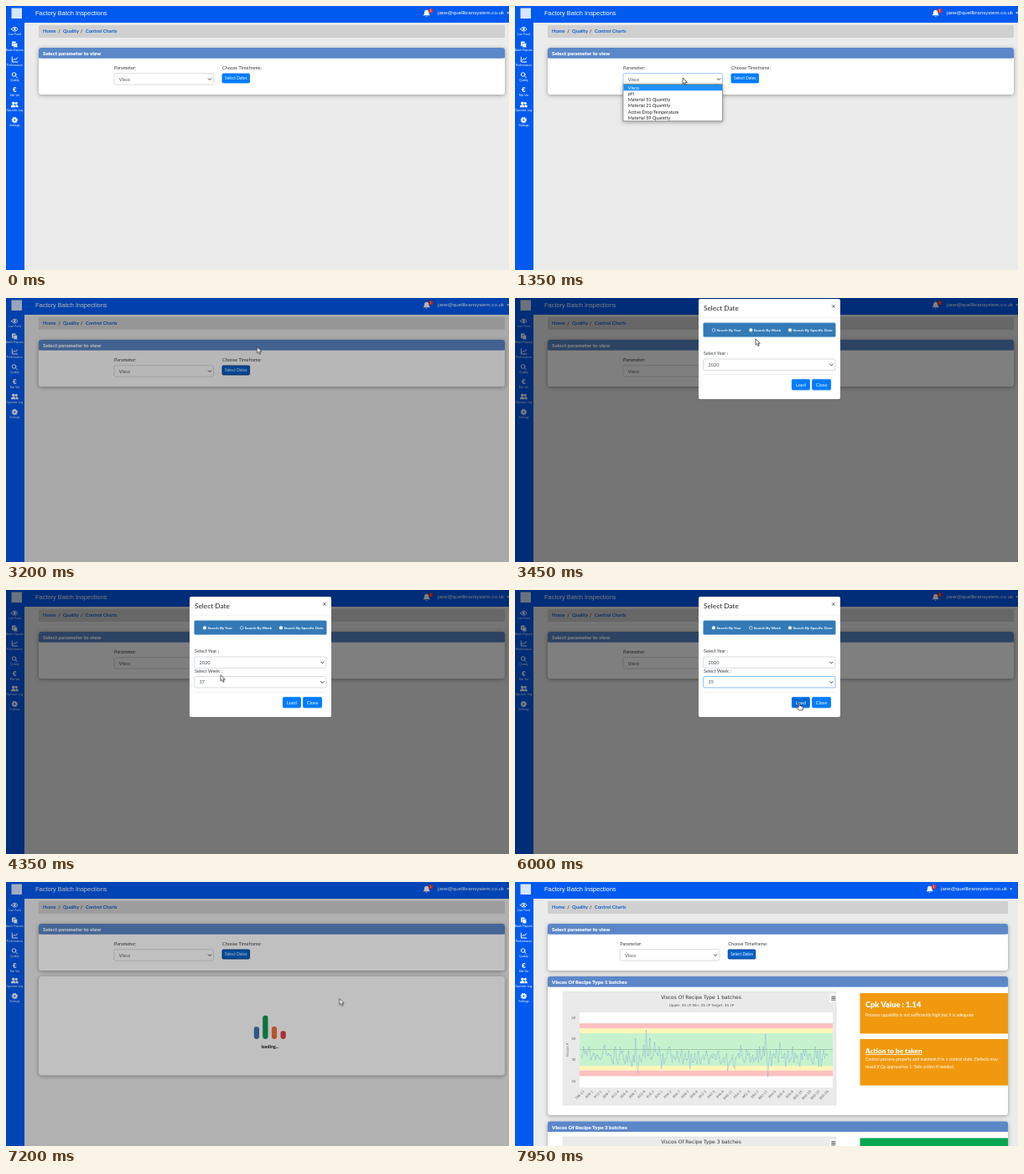
These frames come from a looping animation (600x316 px, 8000 ms). An HTML page:

```html
<!DOCTYPE html>
<html lang="en">
<head>
<meta charset="utf-8">
<title>Control charts</title>
<style>
  html, body { margin: 0; width: 100%; height: 100%; overflow: hidden; background: #ebebeb; }
  svg { display: block; width: 100vw; height: 100vh; font-family: Lato, sans-serif; }
  text { white-space: pre; }
  .arial { font-family: "Liberation Sans", Arial, sans-serif; }
  .chart { font-family: "DejaVu Sans", sans-serif; }
  .bold { font-weight: 700; }
  .heavy { font-weight: 900; }
  .mid { text-anchor: middle; }
  .end { text-anchor: end; }
  .shadow { filter: drop-shadow(0 1.5px 2.5px rgba(0, 0, 0, .35)); }
  .line { fill: none; stroke: #fff; stroke-width: 1; stroke-linecap: round; stroke-linejoin: round; }
</style>
</head>
<body>
<svg id="stage" viewBox="0 0 600 316" preserveAspectRatio="none"></svg>
<script>
const LOOP = 8000;
const BLUE = '#005af0', BUTTON = '#007bff', INK = '#3a3f44';
const RESULTS_AT = 7400;
const stage = document.getElementById('stage');
const $ = id => document.getElementById(id);

// Drawing helpers; text is placed by the middle of its capitals.
const rect = (x, y, w, h, fill, extra = '') =>
  `<rect x="${x}" y="${y}" width="${w}" height="${h}" fill="${fill}" ${extra}/>`;
const text = (x, y, str, size, fill = INK, cls = '', extra = '') =>
  `<text x="${x}" y="${y + size * .36}" font-size="${size}" fill="${fill}" class="${cls}" ${extra}>${str}</text>`;
const circle = (x, y, r, extra) => `<circle cx="${x}" cy="${y}" r="${r}" ${extra}/>`;
const group = (id, body) => `<g id="${id}">${body}</g>`;
const path = (d, extra) => `<path d="${d}" ${extra}/>`;

const card = (y, h, title) =>
  rect(39, y, 556, h, '#fff', 'rx="3.5" class="wide shadow"') +
  rect(39, y, 556, 12.4, '#5b87c9', 'rx="3" class="wide"') +
  rect(39, y + 5, 556, 7.4, '#5b87c9', 'class="wide"') +
  text(44, y + 6.8, title, 6.2, '#fff', 'heavy');

const select = (id, x, y, w, value) =>
  rect(x, y, w, 13.4, '#fff', `id="${id}Box" rx="1.6" stroke="#c8cdd2" stroke-width=".7"`) +
  text(x + 5.8, y + 6.8, value, 5.6, '#495057', '', `id="${id}Value"`) +
  path(`M${x + w - 6.6} ${y + 5.8}l2 2 2-2`, 'fill="none" stroke="#333" stroke-width=".95"');

const button = (id, x, y, w, h, label, size) =>
  rect(x, y, w, h, BUTTON, `id="${id}" rx="1.3" stroke="${BUTTON}" stroke-width=".9"`) +
  text(x + w / 2, y + h / 2, label, size, '#fff', 'mid');

const MENU_STEP = 7.25;
const menu = (id, x, y, w, items) => group(id,
  rect(x, y, w, items.length * MENU_STEP + .6, '#fff', 'stroke="#7a7a7a" stroke-width=".7" class="shadow"') +
  rect(x + .4, y + .3, w - .8, MENU_STEP, '#1e90ff', 'class="hover"') +
  items.map((s, i) => text(x + 5.8, y + 3.9 + i * MENU_STEP, s, 5.5, '#222', 'item')).join(''));

// Sidebar
const sidebar = [
  [34, 'Live Feed', path('M6.5 27.7Q10.3 22.700 14.100 27.700Q10.300 32.700 6.500 27.700Z', 'class="line"') + circle(10.3, 27.7, 1.4, 'fill="#fff"')],
  [52.3, 'Batch Reports', rect(7, 42.5, 4.6, 5.6, '#fff') + rect(9, 44.3, 4.6, 5.4, '#fff', `stroke="${BLUE}" stroke-width=".5"`)],
  [71, 'Performance', path('M7.3 61v6h6.500M8.600 65l1.700-2 1.300 1.200 2-2.500', 'class="line"')],
  [89, 'Quality', circle(9.6, 82, 2.3, 'class="line"') + path('M11.4 83.8l2 2', 'class="line"')],
  [107, 'Mat Var', text(10.3, 100.5, '€', 8.3, '#fff', 'arial bold mid')],
  [125, 'Operator Log', circle(8.8, 116.3, 1.8, 'fill="#fff"') + circle(12.3, 116.3, 1.5, 'fill="#fff"') +
    path('M5.8 121.3q0-3 3-3t3 3zM12.200 121.300q0-2-.8-2.800q3.400-.8 3.400 2.800z', 'fill="#fff"')],
  [143, 'Settings', circle(10.3, 136.5, 2, 'fill="none" stroke="#fff" stroke-width="1.8"') +
    circle(10.3, 136.5, 3.2, 'fill="none" stroke="#fff" stroke-width="1.1" stroke-dasharray="1.3 1.213"')]
].map(([y, label, icon]) => icon + text(10.4, y, label, 3.35, '#fff', 'arial mid')).join('');

const header =
  rect(0, 0, 600, 20, BLUE) + rect(0, 0, 22, 316, BLUE) +
  rect(6.5, 2.5, 12.5, 12.5, '#d6e5fd') +
  text(35, 8, 'Factory Batch Inspections', 7.45, '#fff', 'arial') +
  group('account',
    path('M497.6 11.3q1.400-1.200 1.400-3.300q0-3 2.700-3.300q2.700.3 2.700 3.300q0 2.100 1.400 3.300zM500.500 12h2.400q-1.200 1.600-2.400 0z', 'fill="#fff"') +
    circle(506.6, 5.8, 2.7, 'fill="#e5322d"') +
    text(506.6, 5.8, '1', 3.4, '#fff', 'arial mid') +
    text(594, 8.2, 'jane@quellbransystem.co.uk', 6.15, '#fff', 'arial end') +
    path('M597.2 7.6h3l-1.500 1.800z', 'fill="#fff"'));

const crumbs = rect(39, 23, 556, 15, '#d0d0d0', 'rx="1.5" class="wide"') +
  [[44, 'Home'], [68, 'Quality'], [95, 'Control Charts']]
    .map(([x, s]) => text(x, 30.3, s, 5.8, '#0f5fd0', 'bold')).join('') +
  text(62.2, 30.3, '/', 5.8, '#444', 'bold') + text(88.8, 30.3, '/', 5.8, '#444', 'bold');

const form = group('form',
  text(129, 74, 'Parameter:', 5.5) + select('param', 129, 80.7, 118.6, 'Visco') +
  text(258, 74, 'Choose Timeframe:', 5.5) + button('dates', 258, 81, 32.6, 11, 'Select Dates', 4.85));

// Loading panel
const bars = ['#3f73b5', '#0f9a54', '#f0703a', '#e2404a'];
const loading = group('loading',
  rect(39, 113, 556, 118.5, '#fff', 'rx="4" class="shadow"') +
  bars.map((c, i) => rect(295.5 + i * 10.6, 154, 6.6, 34, c, 'rx="3" class="bar"')).join('') +
  text(315, 197, 'loading...', 5.3, '#111', 'bold mid'));

// Result charts
const POINTS = 210;
const valueY = v => 289 - 2.54 * v;
const spikes = { 46: 40, 48: 24, 53: 37, 55: 44, 58: 40, 62: 38, 124: 25, 130: 26, 156: 42, 158: 22, 168: 38 };
function seriesPath(seed) {
  const random = () => (seed = (seed * 16807) % 2147483647) / 2147483647;
  return 'M' + Array.from({ length: POINTS }, (_, i) => {
    const v = spikes[i] || Math.round(31.5 + (random() + random() - 1) * 5.5);
    return `${(79 + i * 296 / POINTS).toFixed(1)} ${valueY(v).toFixed(1)}`;
  }).join('L');
}
const bands = [[47.2, 44.8, '#fcc0c0'], [44.8, 42.5, '#fdf6b9'], [42.5, 27.1, '#c6f2cd'], [27.1, 24.9, '#fdf6b9'], [24.9, 22.3, '#fcc0c0']];
const batchLabels = ('796-13 808-1 812-1 808-7 812-4 806-4 806-7 822-8 818-2 820-1 856-2 856-7 858-2 858-8 ' +
  '853-3 842-5 846-6 846-11 854-3 862-3 862-7 862-12 850-6 800-4 800-8 800-14 800-19 800-23 800-26').split(' ');

const chart = (type, seed) =>
  card(113, 166, `Viscos Of Recipe Type ${type} batches`) +
  rect(57.5, 131.5, 325.5, 135.5, '#eaeaea', 'stroke="#d8d8d8" stroke-width=".5"') +
  text(222, 137.8, `Viscos Of Recipe Type ${type} batches`, 5.95, '#333', 'chart mid') +
  text(222.5, 148, 'Upper: 45 cP Min: 25 cP Target: 35 cP', 4.15, '#555', 'chart mid') +
  rect(375.5, 134.5, 8.5, 9, '#fff') +
  path('M377.3 137h5.200m-5.200 2.100h5.200m-5.200 2.100h5.200', 'stroke="#555" stroke-width="1.1"') +
  rect(77, 156, 302, 90, '#fff') +
  bands.map(([a, b, c]) => rect(77, valueY(a), 302, 2.54 * (a - b), c)).join('') +
  [20, 30, 40, 50].map(v => text(72.5, valueY(v), v, 4.2, '#666', 'chart end')).join('') +
  rect(77, valueY(35), 302, .5, '#7c9f86') +
  text(0, 0, 'Viscos P', 4.1, '#666', 'chart mid', 'transform="translate(62.5 201) rotate(-90)"') +
  batchLabels.map((s, i) => text(0, 0, s, 3.9, '#666', 'chart end',
    `transform="translate(${82 + i * 10.4} 250) rotate(-45)"`)).join('') +
  path(seriesPath(seed), 'class="series" fill="none" stroke="#7fadd8" stroke-width=".4" marker-mid="url(#dot)"');

const note = (y, h, fill) => rect(411.5, y, 176.5, h, fill);
const ORANGE = '#f0990f';
const results = group('results',
  chart(1, 4242) +
  note(133, 48.5, ORANGE) + text(418, 146.3, 'Cpk Value : 1.14', 9.2, '#fff', 'heavy') +
  text(418, 158.7, 'Process capability is not sufficiently high but it is adequate', 5.08, '#fff') +
  note(188, 55.5, ORANGE) + text(418, 202, 'Action to be taken', 8.15, '#fff', 'heavy', 'text-decoration="underline"') +
  text(418, 212.5, 'Control process properly and maintain it in a control state. Defects may', 5.08, '#fff') +
  text(418, 220.7, 'result if Cp approaches 1. Take action if needed.', 5.08, '#fff') +
  `<g transform="translate(0 173.5)">${chart(3, 977)}${note(133, 48.5, '#07a651')}</g>`);

// Date dialog
const radio = (id, x, label) =>
  circle(x, 45.3, 1.8, `id="${id}" fill="#fff" stroke="#fff" stroke-width=".6"`) +
  text(x + 3.4, 45.5, label, 4.5, '#fff', 'bold');
const modal = group('modal',
  rect(219, 8, 169, 144, '#fff', 'id="sheet" rx="2"') +
  text(225, 19, 'Select Date', 8.3, '#212529') +
  path('M378.2 15.4l3.200 3.200m0-3.200l-3.200 3.200', 'stroke="#555" stroke-width=".9"') +
  rect(219, 29.8, 169, .5, '#dee2e6') +
  rect(224.5, 36.5, 158, 17, '#337ab7', 'rx="1.5"') +
  radio('byYear', 237, 'Search By Year') + radio('byWeek', 281.3, 'Search By Week') +
  radio('byDate', 328, 'Search By Specific Date') +
  text(225, 73.3, 'Select Year :', 5.5) + select('year', 224.7, 80, 157.3, '2020') +
  group('weekField', text(225, 97.3, 'Select Week :', 5.5) + select('week', 224.7, 103.5, 157.3, '37') +
    text(230.5, 110.3, '35', 5.6, '#495057', '', 'id="weekPicked"')) +
  group('footer', rect(224.5, 122, 158, .5, '#dee2e6') +
    button('load', 330.4, 128.4, 21, 12.4, 'Load', 5.7) + button('close', 354.6, 128.4, 22, 12.4, 'Close', 5.7)) +
  menu('weekMenu', 224.7, 117, 157.3, ['37', '36', '35']));

const outline = 'fill="#fff" stroke="#222" stroke-width=".7" stroke-linejoin="round"';
const cursor = group('cursor',
  path('M0 0v7.300l1.700-1.500 1.300 2.900 1.300-.6-1.300-2.700h2.300z', `id="arrow" ${outline}`) +
  path('M-.7.6q.8-1 1.500 0v3l3.200.8q.8.300.7 1.300l-.6 3.300h-4.300l-2.500-3.200q0-1.200 1-.9l1 .8z', `id="hand" ${outline}`));

stage.innerHTML =
  `<defs><marker id="dot" viewBox="-1 -1 2 2" markerWidth="1" markerHeight="1" markerUnits="userSpaceOnUse">${circle(0, 0, 1, 'fill="#6f9fd2"')}</marker></defs>` +
  rect(0, 0, 600, 316, '#ebebeb') + header + sidebar + crumbs +
  card(50, 56, 'Select parameter to view') + form +
  menu('paramMenu', 129, 93.7, 118.6, ['Visco', 'pH', 'Material 51 Quantity', 'Material 21 Quantity', 'Active Drop Temperature', 'Material 59 Quantity']) +
  loading + results + rect(0, 0, 600, 316, '#000', 'id="backdrop"') + modal + cursor;

// Motion helpers; steps are [ms, value].
function track(el, prop, steps, easing = 'linear') {
  const padded = [[0, steps[0][1]], ...steps, [LOOP, steps[steps.length - 1][1]]];
  el.animate(padded.map(([ms, value]) => ({ offset: ms / LOOP, [prop]: value, easing })),
    { duration: LOOP, iterations: Infinity });
}
const hold = (el, prop, steps) => track(el, prop, steps, 'step-end');
const show = (el, from, to = LOOP) => hold(el, 'opacity', [[0, 0], [from, 1], [to, 0]]);
const shift = (x, y) => `translate(${x}px, ${y}px)`;

function runMenu(id, from, to, hovers) {
  const el = $(id);
  show(el, from, to);
  hold(el.querySelector('.hover'), 'transform', hovers.map(([ms, i]) => [ms, shift(0, i * MENU_STEP)]));
  el.querySelectorAll('.item').forEach((item, i) =>
    hold(item, 'fill', hovers.map(([ms, on]) => [ms, on === i ? '#fff' : '#222'])));
}

runMenu('paramMenu', 1300, 2500, [[0, 0], [1640, 1], [1720, 2], [1800, 3], [1930, 2], [2020, 1], [2100, 0]]);
runMenu('weekMenu', 4600, 5600, [[0, 0], [5150, 1], [5250, 2]]);
hold($('paramBox'), 'stroke', [[0, '#c8cdd2'], [1300, '#6fb0f5'], [2850, '#c8cdd2']]);
hold($('weekBox'), 'stroke', [[0, '#c8cdd2'], [4600, '#5aa5f5']]);
hold($('dates'), 'stroke', [[0, BUTTON], [2850, '#083c86']]);
hold($('dates'), 'fill', [[0, BUTTON], [2650, '#0069d9'], [2850, '#0062cc']]);
hold($('load'), 'fill', [[0, BUTTON], [5900, '#0069d9'], [6480, BUTTON]]);
hold($('close'), 'fill', [[0, BUTTON], [6520, '#0069d9']]);

track($('backdrop'), 'opacity', [[3100, 0], [3280, .5], [7100, .5], [7300, 0]]);
track($('modal'), 'opacity', [[3280, 0], [3430, 1], [6950, 1], [7090, 0]]);
track($('modal'), 'transform', [[3280, shift(0, -16)], [3580, shift(0, 0)], [6950, shift(0, 0)], [7110, shift(0, -16)]]);
const WEEK_AT = 3750;
hold($('byYear'), 'fill', [[0, '#337ab7'], [WEEK_AT, '#fff']]);
hold($('byWeek'), 'fill', [[0, '#fff'], [WEEK_AT, '#337ab7']]);
hold($('sheet'), 'height', [[0, '120px'], [WEEK_AT, '144px']]);
hold($('footer'), 'transform', [[0, shift(0, -24)], [WEEK_AT, shift(0, 0)]]);
show($('weekField'), WEEK_AT);
hold($('weekValue'), 'opacity', [[0, 1], [5600, 0]]);
show($('weekPicked'), 5600);

show($('loading'), 6750, RESULTS_AT);
const phases = [4.71, 1.57, 2.68, 3.34];
document.querySelectorAll('.bar').forEach((bar, i) => {
  const steps = [];
  for (let ms = 6750; ms <= RESULTS_AT; ms += 50) {
    const h = 21.5 + 12.5 * Math.sin(phases[i] + (ms - 7050) / 150);
    steps.push([ms, `inset(${34 - h}px 0 0 0 round 3px)`]);
  }
  track(bar, 'clipPath', steps);
});

show($('results'), RESULTS_AT);
document.querySelectorAll('.wide').forEach(el => hold(el, 'width', [[0, '556px'], [RESULTS_AT, '549px']]));
hold($('account'), 'transform', [[0, shift(0, 0)], [RESULTS_AT, shift(-7, 0)]]);
hold($('form'), 'transform', [[0, shift(0, 0)], [RESULTS_AT, shift(-3.8, 0)]]);
document.querySelectorAll('.series').forEach(el =>
  track(el, 'clipPath', [[RESULTS_AT, 'inset(-3px 100% -3px -3px)'], [7900, 'inset(-3px -3px -3px -3px)']]));

track($('cursor'), 'transform', [
  [800, 612, 40], [1250, 200, 86], [1400, 200, 86], [1550, 190, 97], [1850, 200, 118], [2120, 225, 97],
  [2350, 260, 95.5], [2500, 262, 95.5], [2700, 273, 86], [2900, 273, 86], [3200, 299.5, 58.5],
  [3550, 282, 45], [3850, 282, 45], [4350, 256, 101.5], [4450, 256, 108], [5100, 256, 108],
  [5350, 256, 134], [5600, 256, 134], [5950, 339, 135], [6400, 339, 135], [6600, 366, 137],
  [6900, 366, 137], [7050, 366.5, 138], [7150, 366.5, 138], [7550, 612, 150]
].map(([ms, x, y]) => [ms, shift(x, y)]));
const handSteps = [[0, 0], [2650, 1], [2950, 0], [5900, 1], [6950, 0]];
hold($('hand'), 'opacity', handSteps);
hold($('arrow'), 'opacity', handSteps.map(([ms, on]) => [ms, 1 - on]));
</script>
</body>
</html>
```
